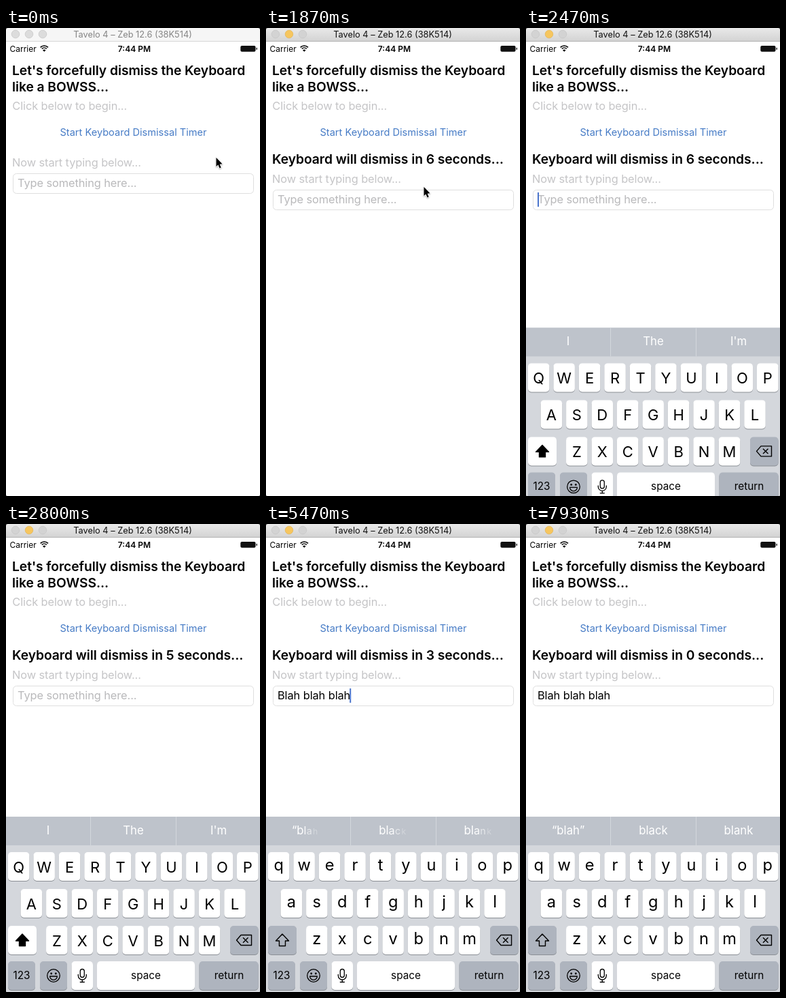
An HTML page with a canvas for the animation above (8 s loop, 374 px wide and 686 px high).

```html
<!DOCTYPE html>
<html lang="en">
<head>
<meta charset="utf-8">
<title>Keyboard dismissal timer</title>
<style>
html, body { margin: 0; width: 100%; height: 100%; overflow: hidden; background: #fff; }
canvas { display: block; width: 374px; height: 686px; }
</style>
</head>
<body>
<canvas id="stage" width="374" height="686"></canvas>
<script>
const ctx = document.getElementById('stage').getContext('2d');
const W = 374, H = 686, LOOP = 8000;
const ACTIVATE = 470, LABEL_IN = 1470, FIRST_TICK = 1530, FOCUS = 2130, FIRST_KEY = 3600;
const KEY_TIMES = [3600, 3730, 3830, 4000, 4130, 4270, 4400, 4530, 4660, 4800, 5000, 5130, 5330, 5400];
const PHRASE = 'Blah blah blah';
const POINTER = [[0, 309, 190], [200, 302, 199], [600, 226, 152], [930, 224, 151],
  [1200, 234, 238], [1870, 232, 233], [2070, 229, 241]];
const SUGGESTIONS = [
  [FOCUS - 500, ['I', 'The', 'I\'m']],
  [3730, ['“B”', 'But', 'Because']],
  [4070, ['“Blah”', 'Black', 'Blank']],
  [4330, ['“b”', 'but', 'because']],
  [4600, ['“blah”', 'black', 'blank']],
  [4830, ['I', 'the', 'and']],
  [5070, ['“b”', 'that', 'but']],
  [5380, ['“blah”', 'black', 'blank']]
];

const clamp = (v, lo = 0, hi = 1) => Math.min(hi, Math.max(lo, v));

function text(str, x, y, size, color, { weight = 400, align = 'left', spacing = 0 } = {}) {
  ctx.font = `${weight} ${size}px Inter, "Open Sans", sans-serif`;
  ctx.letterSpacing = `${spacing}px`;
  ctx.textAlign = align;
  ctx.fillStyle = color;
  ctx.fillText(str, x, y);
}
const heading = (str, y) => text(str, 9, y, 19.3, '#000', { weight: 600, spacing: -0.07 });
const body = (str, x, y, color) => text(str, x, y, 16.4, color, { spacing: -0.1 });

function box(x, y, w, h, r, fill, stroke) {
  ctx.beginPath();
  ctx.roundRect(x, y, w, h, r);
  paint(fill, stroke);
}
function disc(x, y, r, fill, stroke) {
  ctx.beginPath();
  ctx.arc(x, y, r, 0, 2 * Math.PI);
  paint(fill, stroke);
}
function poly(points, fill, stroke) {
  ctx.beginPath();
  points.forEach(([x, y]) => ctx.lineTo(x, y));
  ctx.closePath();
  paint(fill, stroke);
}
function paint(fill, stroke) {
  if (fill) { ctx.fillStyle = fill; ctx.fill(); }
  if (stroke) { ctx.strokeStyle = stroke; ctx.stroke(); }
}
function arc(x, y, r, from, to) {
  ctx.beginPath();
  ctx.arc(x, y, r, from, to);
  ctx.stroke();
}

function titleBar(active) {
  const shade = ctx.createLinearGradient(0, 0, 0, 20);
  shade.addColorStop(0, active ? '#e9e9e9' : '#f6f6f6');
  shade.addColorStop(1, active ? '#d2d2d2' : '#f6f6f6');
  ctx.fillStyle = shade;
  ctx.fillRect(0, 0, W, 20);
  ctx.fillStyle = active ? '#b3b3b3' : '#d6d6d6';
  ctx.fillRect(0, 19, W, 1);
  ctx.lineWidth = 0.7;
  [14, 34, 54].forEach((x, i) => {
    const lit = active && i === 1;
    disc(x, 9, 5.8, lit ? '#f6c65f' : active ? '#d3d3d3' : '#dcdcdc', lit ? '#e3b354' : '#c5c5c5');
  });
  text('Tavelo 4 – Zeb 12.6 (38K514)', 186.5, 14, 12.8, active ? '#111' : '#858585', { align: 'center' });
}

function statusBar() {
  text('Carrier', 5.5, 34.5, 12, '#000');
  text('7:44 PM', 188.9, 34.5, 12, '#000', { weight: 600, align: 'center' });
  ctx.strokeStyle = '#000';
  ctx.lineWidth = 1.7;
  arc(56.3, 34, 8, -2.35, -0.79);
  arc(56.3, 34, 5, -2.35, -0.79);
  ctx.beginPath();
  ctx.moveTo(56.3, 34.8);
  ctx.arc(56.3, 34.8, 3.2, -2.35, -0.79);
  paint('#000');
  box(345.3, 25.9, 22.2, 8.8, 2, '#111');
  box(368.5, 28.7, 1.4, 3.2, 0.7, '#222');
}

function caretAlpha(t) {
  if (t < FOCUS) return 0;
  const last = KEY_TIMES.filter(k => k <= t).pop() || FOCUS;
  const phase = (t - last) % 1000;
  return Math.max(clamp((500 - phase) / 100), clamp((phase - 900) / 100));
}

function page(t) {
  heading('Let\'s forcefully dismiss the Keyboard', 69.3);
  heading('like a BOWSS...', 92.7);
  body('Click below to begin...', 9.3, 120, '#c5c5c7');
  ctx.globalAlpha = t < ACTIVATE ? 1 : 0.25 + 0.75 * clamp((t - 620) / 260);
  text('Start Keyboard Dismissal Timer', 187.5, 158, 14.6, '#477cc6', { align: 'center' });
  ctx.globalAlpha = 1;

  const running = t >= LABEL_IN;
  const drop = running ? 24 : 0;
  if (running) {
    const left = 6 - Math.max(0, Math.floor((t - FIRST_TICK) / 1000));
    heading(`Keyboard will dismiss in ${left} seconds...`, 199.3);
  }
  body('Now start typing below...', 9, 203 + drop, '#c5c5c7');

  ctx.lineWidth = 1;
  box(10.5, 213.5 + drop, 354, 29, 5, '#fff', '#dfdfdf');
  const typed = PHRASE.slice(0, KEY_TIMES.filter(k => k <= t).length);
  body(typed || 'Type something here...', 17, 233.2 + drop, typed ? '#000' : '#b9b9bb');
  const end = typed ? ctx.measureText(typed).width - 1 : 0;
  ctx.globalAlpha = caretAlpha(t);
  ctx.fillStyle = '#4a74cc';
  ctx.fillRect(17 + end, 217 + drop, 2, 21);
  ctx.globalAlpha = 1;
}

// Letters appear one after another, each growing to full size.
function suggestion(str, x, y, age) {
  const size = 16.8;
  ctx.font = `400 ${size}px Inter, "Open Sans", sans-serif`;
  ctx.letterSpacing = '0px';
  const advances = [...str].map((_, i) => ctx.measureText(str.slice(0, i)).width);
  const left = x - ctx.measureText(str).width / 2;
  [...str].forEach((ch, i) => {
    const shown = clamp((age - i * 18) / 60);
    ctx.globalAlpha = shown;
    text(ch, left + advances[i], y, size * (0.6 + 0.4 * shown), '#fff');
  });
  ctx.globalAlpha = 1;
}

function suggestionBar(t) {
  ctx.fillStyle = '#bec3cb';
  ctx.fillRect(0, 429, W, 42);
  ctx.fillStyle = '#d3d7dc';
  [124, 250].forEach(x => ctx.fillRect(x, 429, 1, 42));
  const now = SUGGESTIONS.findLastIndex(s => s[0] <= t);
  if (now < 0) return;
  const age = t - SUGGESTIONS[now][0];
  [62, 187.5, 313].forEach((x, i) => {
    if (now && age < 80) {
      ctx.globalAlpha = 1 - age / 80;
      text(SUGGESTIONS[now - 1][1][i], x, 454.5, 16.8, '#fff', { align: 'center' });
      ctx.globalAlpha = 1;
    }
    suggestion(SUGGESTIONS[now][1][i], x, 454.5, age);
  });
}

function key(x, y, w, dark) {
  box(x, y + 1, w, 42, 5, '#8b8f95');
  box(x, y, w, 42, 5, dark ? '#aeb4be' : '#fff');
}

function keyIcons(upper) {
  ctx.lineWidth = 1.4;
  ctx.lineJoin = 'round';
  poly([[24, 601], [33.5, 611], [28.5, 611], [28.5, 618.5], [19.5, 618.5], [19.5, 611], [14.5, 611]],
    upper ? '#000' : null, '#000');
  poly([[339.5, 610], [346, 602.5], [361.5, 602.5], [361.5, 617.5], [346, 617.5]], null, '#000');
  ctx.beginPath();
  ctx.moveTo(349, 606.3); ctx.lineTo(356.5, 613.7);
  ctx.moveTo(356.5, 606.3); ctx.lineTo(349, 613.7);
  ctx.stroke();

  ctx.lineWidth = 1.3;
  disc(70, 662, 9.3, null, '#000');
  [66.7, 73.3].forEach(x => disc(x, 659, 1.4, '#000'));
  ctx.beginPath();
  ctx.arc(70, 663, 5.4, 0, Math.PI);
  ctx.closePath();
  ctx.stroke();

  box(109.3, 652.5, 6, 12, 3, null, '#000');
  ctx.beginPath();
  ctx.moveTo(106.3, 660);
  ctx.lineTo(106.3, 662);
  ctx.arc(112.3, 662, 6, Math.PI, 0, true);
  ctx.lineTo(118.3, 660);
  ctx.moveTo(112.3, 668);
  ctx.lineTo(112.3, 671.5);
  ctx.moveTo(108.8, 671.5);
  ctx.lineTo(115.8, 671.5);
  ctx.stroke();
}

function keyboard(t) {
  const remaining = Math.pow(1 - clamp((t - FOCUS) / 500), 2.8);
  if (remaining === 1) return;
  const upper = t < FIRST_KEY;
  ctx.save();
  ctx.translate(0, 257 * remaining);
  ctx.fillStyle = '#d4d7dc';
  ctx.fillRect(0, 429, W, 257);
  suggestionBar(t);

  [['qwertyuiop', 18.7, 481], ['asdfghjkl', 37.4, 535], ['zxcvbnm', 74.8, 589]].forEach(([row, first, y]) => {
    [...row].forEach((ch, i) => {
      const x = first + i * 37.45;
      key(x - 15.75, y, 31.5);
      if (upper) text(ch.toUpperCase(), x, y + 29.5, 22, '#000', { align: 'center' });
      else text(ch, x, y + 27.3, 23.6, '#000', { align: 'center' });
    });
  });

  key(3, 589, 42, !upper);
  key(330, 589, 41.5, true);
  key(3, 641, 40, true);
  key(50, 641, 40, true);
  key(96.5, 641, 31.5);
  key(134, 641, 144);
  key(284.5, 641, 87, true);
  [['123', 23], ['space', 206], ['return', 328.5]].forEach(([label, x]) =>
    text(label, x, 667, 15.3, '#000', { align: 'center' }));
  keyIcons(upper);
  ctx.restore();
}

function pointer(t) {
  if (t >= FOCUS) return;
  const next = POINTER.findIndex(p => p[0] > t);
  let [, x, y] = POINTER[POINTER.length - 1];
  if (next > 0) {
    const [t0, x0, y0] = POINTER[next - 1], [t1, x1, y1] = POINTER[next];
    const p = (t - t0) / (t1 - t0), ease = p * p * (3 - 2 * p);
    x = x0 + (x1 - x0) * ease;
    y = y0 + (y1 - y0) * ease;
  }
  ctx.save();
  ctx.translate(x + 0.5, y);
  ctx.lineWidth = 1.6;
  ctx.lineJoin = 'round';
  ctx.shadowColor = 'rgba(0,0,0,.3)';
  ctx.shadowBlur = 2;
  ctx.shadowOffsetY = 1;
  const shape = [[0, 0], [0, 13], [2.9, 10.4], [5, 15.5], [7.2, 14.6], [5.1, 9.7], [9, 9.3]];
  poly(shape, null, '#fff');
  ctx.shadowColor = 'transparent';
  poly(shape, '#000');
  ctx.restore();
}

function draw() {
  const t = performance.now() % LOOP;
  ctx.fillStyle = '#555';
  ctx.fillRect(0, 0, W, H);
  ctx.save();
  ctx.beginPath();
  ctx.roundRect(0, 0, W, H, [4, 4, 2, 2]);
  ctx.clip();
  ctx.fillStyle = '#fff';
  ctx.fillRect(0, 0, W, H);
  titleBar(t >= ACTIVATE);
  statusBar();
  page(t);
  keyboard(t);
  pointer(t);
  ctx.restore();
  requestAnimationFrame(draw);
}
draw();
</script>
</body>
</html>
```
